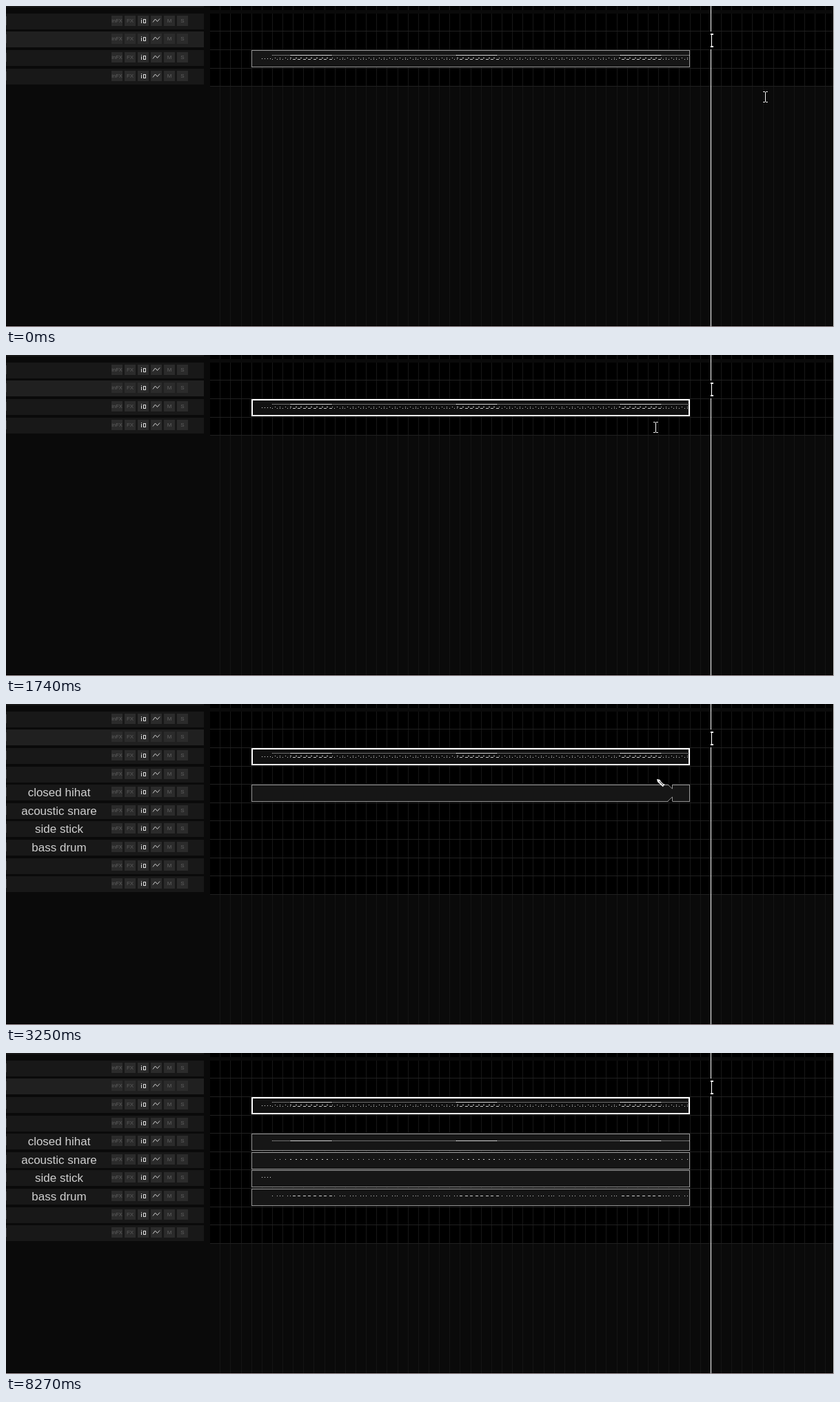
An HTML page with a canvas for the animation above (8.83 s loop, 1201 by 466 pixels).

```html
<!DOCTYPE html>
<html lang="en">
<head>
<meta charset="utf-8">
<title>Track view</title>
<style>
html, body { margin: 0; width: 100%; height: 100%; overflow: hidden; background: #0a0a0a; }
canvas { display: block; }
</style>
</head>
<body>
<canvas id="stage" width="1201" height="466"></canvas>
<script>
const c = document.getElementById('stage').getContext('2d');
const LOOP = 8830, W = 1201, H = 466;
const LANES = 296, BEAT = 15.14, LEFT = 356, RIGHT = 991;
const NAMES = { 4: 'closed hihat', 5: 'acoustic snare', 6: 'side stick', 7: 'bass drum' };
const FILLS = [413, 652, 890], FILL_LEN = 60;

const rowY = i => Math.floor(10.2 + 26.6 * i);
const inFill = x => FILLS.some(f => x >= f - 1 && x < f + FILL_LEN);

function box(x, y, w, h, color) {
  c.fillStyle = color;
  c.fillRect(x, y, w, h);
}

function frame(x, y, w, h, color, line = 1) {
  c.strokeStyle = color;
  c.lineWidth = line;
  c.strokeRect(x + line / 2, y + line / 2, w - line, h - line);
}

function path(points, x = 0, y = 0) {
  c.beginPath();
  points.forEach(([px, py]) => c.lineTo(x + px, y + py));
}

function label(text, x, y, size, color) {
  c.font = `${size}px "Liberation Sans", Arial, sans-serif`;
  c.textAlign = 'center';
  c.fillStyle = color;
  c.fillText(text, x, y);
}

function header(i) {
  const y = rowY(i);
  box(0, y + 1, 287, 23, i === 1 ? '#202020' : '#181818');
  box(0, y + 5, 1, 13, '#3a3a3a');
  for (let k = 0; k < 6; k++) box(153 + 19 * k, y + 4, 16, 15, '#2b2b2b');
  label('inFX', 161, y + 14, 7.5, '#606060');
  label('FX', 180, y + 14, 8, '#5c5c5c');
  label('M', 237, y + 14, 8, '#606060');
  label('S', 256, y + 14, 8, '#606060');
  box(196, y + 8, 1, 1, '#ddd');
  box(196, y + 10, 1, 5, '#ddd');
  frame(199, y + 9, 4, 6, '#ddd');
  path([[213, 14], [216.5, 9.5], [219.5, 13], [223, 9]], 0, y - 0.5);
  c.strokeStyle = '#ccc';
  c.lineWidth = 1;
  c.stroke();
  if (NAMES[i]) label(NAMES[i], 77, y + 18, 17, '#d0d0d0');
}

function background(rows) {
  const end = rowY(rows);
  box(0, 0, W, H, '#0a0a0a');
  box(0, 0, 287, 2, '#181818');
  box(LANES, 0, W - LANES, end, '#000');
  for (let x = LANES - 0.4 + BEAT; x < W; x += BEAT) {
    box(Math.floor(x), 0, 1, end, '#171717');
    box(Math.floor(x), end, 1, H - end, '#141414');
  }
  box(LANES, 6, W - LANES, 5, '#0a0a0a');
  for (let i = 1; i <= rows; i++) box(LANES, rowY(i), W - LANES, 1, '#202020');
  for (let i = 0; i < rows; i++) header(i);
}

function editCursor(dragging) {
  box(1022, 0, 1, 37, '#fff');
  box(1022, 63, 1, H - 63, '#fff');
  box(dragging ? 1022 : 1023, 40, 1, 20, '#fff');
  box(1022, 40, 4, 2, '#fff');
  box(1022, 58, 4, 2, '#fff');
}

const notes = {
  hihat(y) {
    for (let x = 386; x < RIGHT; x += 2) box(x, y, 1, 1, '#c8c8c8');
    FILLS.forEach(x => box(x, y, FILL_LEN, 1, '#d0d0d0'));
  },
  snare(y) {
    for (let x = 390; x < RIGHT - 1; x += BEAT / 2) {
      box(Math.floor(x), y, inFill(x) ? 2 : 1, 1, '#ccc');
    }
  },
  stick(y) {
    for (let k = 0; k < 4; k++) box(371 + 4 * k, y, 1, 1, '#ddd');
  },
  bass(y) {
    for (let x = 386, k = 0; x < RIGHT - 2; x += BEAT / 2, k++) {
      const px = Math.floor(x);
      if (inFill(x)) box(px, y, 4, 1, '#ccc');
      else {
        box(px, y, 1, 1, '#ccc');
        if (k % 2) box(px + 4, y, 1, 1, '#ccc');
      }
    }
  }
};

function clip(i, selected) {
  const y = rowY(i) + 1;
  box(LEFT, y, RIGHT - LEFT + 1, 25, selected ? '#111' : '#161616');
  frame(LEFT, y, RIGHT - LEFT + 1, 25, selected ? '#fff' : '#969696', selected ? 2 : 1);
  return y;
}

function drumClip(selected) {
  const y = clip(2, selected);
  notes.hihat(y + 7);
  notes.snare(y + 11);
  notes.stick(y + 12);
  notes.bass(y + 13);
}

// An empty clip with loop notches near its right end
function notchedClip() {
  const y = clip(4), b = y + 24;
  for (const [edge, dir] of [[y, 1], [b, -1]]) {
    path([[960, edge - dir], [966.5, edge + 6 * dir], [966.5, edge - dir]]);
    c.fillStyle = '#000';
    c.fill();
    path([[960, edge], [966.5, edge + 6 * dir], [966.5, edge]]);
    c.strokeStyle = '#969696';
    c.lineWidth = 1;
    c.stroke();
  }
}

function splitClips() {
  ['hihat', 'snare', 'stick', 'bass'].forEach((part, k) => notes[part](clip(4 + k) + 10));
}

// Burning swallows dark tones inside the box and keeps bright lines
function marquee(x, bottom) {
  const w = 1070 - x, h = bottom - 40;
  c.globalCompositeOperation = 'color-burn';
  box(x, 41, w, h, '#e6e6e6');
  c.globalCompositeOperation = 'source-over';
  frame(x, 41, w, h, '#a0a0a0');
}

const pointers = {
  beam(x, y) {
    const stroke = (color, g) => {
      for (const [dx, dy, w, h] of [[-3, -8, 3, 1], [1, -8, 3, 1], [0, -7, 1, 14], [-3, 7, 3, 1], [1, 7, 3, 1]]) {
        box(x + dx - g, y + dy - g, w + 2 * g, h + 2 * g, color);
      }
    };
    stroke('#000', 1);
    stroke('#fff', 0);
  },
  arrow(x, y) {
    path([[0, 0], [0, 15], [3.3, 12], [6, 18.3], [8.4, 17.3], [5.8, 11], [10.3, 10.8]], x, y);
    c.closePath();
    c.lineWidth = 1.5;
    c.strokeStyle = '#000';
    c.stroke();
    c.fillStyle = '#fff';
    c.fill();
  },
  pencil(x, y) {
    path([[0, 0], [4, 0.8], [11.5, 8], [8.8, 11.3], [1, 4]], x, y);
    c.closePath();
    c.fillStyle = '#fff';
    c.fill();
    c.strokeStyle = '#000';
    c.lineWidth = 1;
    path([[3.5, 3.2], [9.3, 8.8]], x, y);
    c.stroke();
    path([[5.4, 2.6], [10, 7]], x, y);
    c.stroke();
  }
};

// [start ms, pointer, x, y]
const moves = [
  [0, 'beam', 1101, 132],
  [610, 'beam', 1091, 101],
  [730, 'beam', 1078, 68],
  [890, 'beam', 1069, 38],
  [1040, 'arrow', 1035, 58],
  [1190, 'arrow', 951, 105],
  [1340, 'arrow', 943, 107.5],
  [1740, 'beam', 942, 105],
  [2610, 'pencil', 944, 109],
  [3370, 'beam', 942, 105],
  [7340, 'arrow', 946, 118],
  [7460, 'arrow', 966.5, 155],
  [7610, 'beam', 1001, 229],
  [7730, 'beam', 1037, 304],
  [7880, 'beam', 1092, 367],
  [8000, 'beam', 1144, 427],
  [8150, 'beam', 1163, 458],
  [8270, null]
];

// [start ms, left, bottom] of the selection box, anchored at its top right
const drags = [[1040, 1034, 57], [1190, 950, 104], [1490, 942, 106], [1740, null]];

const at = (list, t) => list.filter(item => item[0] <= t).pop();

function draw(t) {
  const drag = at(drags, t), dragging = drag && drag[1] !== null;
  background(t < 3130 ? 4 : 10);
  drumClip(t >= 1740);
  if (t >= 3370) splitClips();
  else if (t >= 3250) notchedClip();
  if (dragging) marquee(drag[1], drag[2]);
  editCursor(dragging);
  box(1200, 0, 1, H, '#d8d8d8');
  box(0, 465, W, 1, '#a89ca0');
  const [, kind, x, y] = at(moves, t);
  if (kind) pointers[kind](x, y);
}

const start = performance.now();
function tick() {
  draw((performance.now() - start) % LOOP);
  requestAnimationFrame(tick);
}
tick();
</script>
</body>
</html>
```
